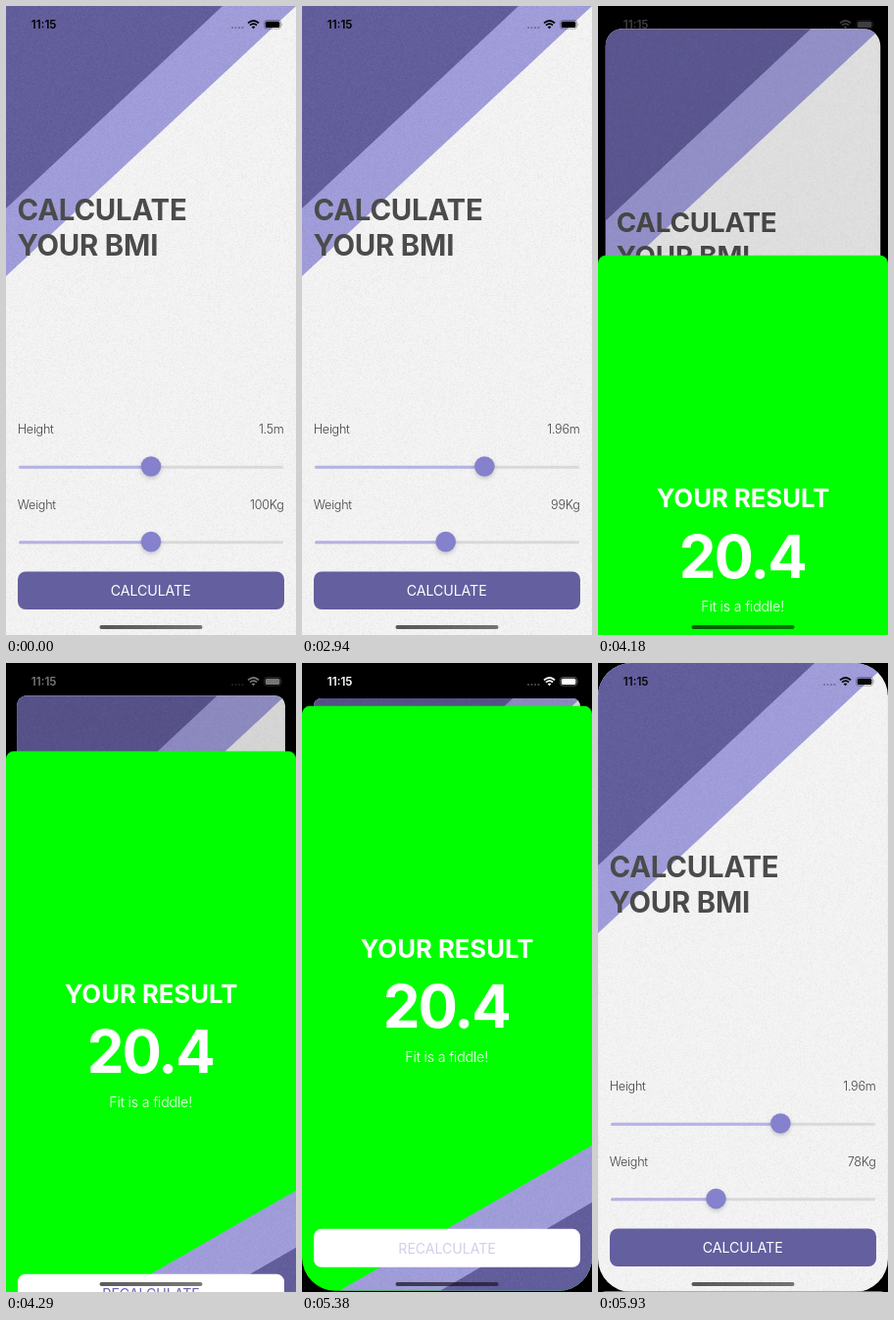
Write an HTML page with a canvas that moves like this. It is 296 px wide and 640 px high and loops after 5.99 s.

```html
<!DOCTYPE html>
<html lang="en">
<head>
<meta charset="utf-8">
<title>BMI calculator</title>
<style>
  html, body { margin: 0; width: 100%; height: 100%; overflow: hidden; background: #000; }
  #stage { position: relative; width: 296px; height: 640px; overflow: hidden; background: #000; }
  #stage > *, #card > *, #sheet > * { position: absolute; left: 0; top: 0; display: block; }
  #card { width: 296px; height: 640px; overflow: hidden; background: #f4f4f4; transform-origin: 50% 0; }
  #dim { width: 100%; height: 100%; background: #000; }
  #sheet { width: 296px; height: 595px; overflow: hidden; background: #0f0; border-radius: 8px 8px 34px 34px; }
  #sheet canvas { clip-path: polygon(296px 447px, 296px 595px, 38px 595px); }
  text { font-family: Inter, "Liberation Sans", sans-serif; }
  .title { font-size: 29.3px; font-weight: 700; letter-spacing: -.2px; fill: #4b4b4b; }
  .label { font-size: 12.6px; font-weight: 300; letter-spacing: -.25px; fill: #444; }
  .button { font-size: 14.2px; letter-spacing: -.1px; text-anchor: middle; }
  .end { text-anchor: end; }
  .result { font-weight: 700; text-anchor: middle; fill: #fff; }
  .clock { font-size: 11.7px; font-weight: 600; fill: currentColor; }
  .knob { fill: #8581cd; filter: drop-shadow(0 2px 2px rgba(0, 0, 0, .18)); }
</style>
</head>
<body>
<div id="stage">
  <div id="card">
    <svg width="296" height="640">
      <path d="M0 0H296L0 275Z" fill="#a09ddb"/>
      <path d="M0 0H221L0 206Z" fill="#625d9c"/>
    </svg>
    <canvas width="296" height="640"></canvas>
    <svg width="296" height="640">
      <text class="title" x="11.5" y="218">CALCULATE</text>
      <text class="title" x="11.5" y="254.2">YOUR BMI</text>
      <g id="sliders"></g>
      <rect x="12" y="575.5" width="272" height="38.5" rx="8" fill="#645f9e"/>
      <text class="button" id="calculate" x="147.7" y="600.3" fill="#fff">CALCULATE</text>
    </svg>
    <div id="dim"></div>
  </div>
  <div id="sheet">
    <svg width="296" height="595">
      <path d="M296 447V595H38Z" fill="#a09ddb"/>
      <path d="M296 505V595H141Z" fill="#625d9c"/>
    </svg>
    <canvas width="296" height="595"></canvas>
    <svg width="296" height="595">
      <text class="result" x="148" y="256.5" font-size="25.7">YOUR RESULT</text>
      <text class="result" x="147.2" y="327.7" font-size="60" letter-spacing="-2">20.4</text>
      <text class="result" x="147.7" y="362" font-size="14.2" letter-spacing="-.15" style="font-weight:300">Fit is a fiddle!</text>
      <rect x="12" y="532" width="272" height="39" rx="8" fill="#fff"/>
      <text class="button" id="recalculate" x="148" y="557.3" fill="#6863b8">RECALCULATE</text>
    </svg>
  </div>
  <svg id="status" width="296" height="40">
    <text class="clock" x="25.8" y="23.2">11:15</text>
    <g fill="currentColor" opacity=".3">
      <circle cx="231" cy="22" r="1.1"/><circle cx="234.5" cy="22" r="1.1"/>
      <circle cx="238" cy="22" r="1.1"/><circle cx="241.5" cy="22" r="1.1"/>
    </g>
    <g fill="none" stroke="currentColor" stroke-width="1.8">
      <path d="M247 17.4Q252.5 12.6 258 17.4M249 19.7Q252.5 16.6 256 19.7"/>
      <path d="M250.6 21.3Q252.5 19.8 254.4 21.3L252.5 23.3Z" fill="currentColor" stroke="none"/>
    </g>
    <rect x="263.6" y="14.5" width="17" height="8.6" rx="2.5" fill="none" stroke="currentColor" stroke-width=".8" opacity=".4"/>
    <rect x="264.8" y="15.7" width="14.6" height="6.2" rx="1.5" fill="currentColor"/>
    <path d="M281.6 17.4Q283 18.8 281.6 20.2Z" fill="currentColor" opacity=".5"/>
  </svg>
  <svg width="296" height="640">
    <linearGradient id="bar"><stop stop-opacity=".64"/><stop offset="1" stop-opacity=".52"/></linearGradient>
    <rect x="95.5" y="630" width="105" height="4" rx="2" fill="url(#bar)"/>
  </svg>
</div>
<script>
const LOOP = 5990, OPEN = 4059, CLOSE = 5444, FADE = 500;
const $ = id => document.getElementById(id);
const mix = (a, b, k) => a + (b - a) * k;
const clamp = v => Math.min(1, Math.max(0, v));

// [start, value] steps; each value holds until the next one
const heights = [[0, 1.5], [1590, 1.55], [1740, 1.7], [1860, 1.88], [1980, 1.96]];
const weights = [[0, 100], [2940, 99], [3050, 89], [3200, 79], [3850, 78]];
const ticks = [0, 4070, 4180, 4290, 4400, 4520, 5380, 5490, 5600, 5710, 5820, 5930];
const at = (steps, t) => steps.filter(s => s[0] <= t).pop()[1];

// Paper grain from a seeded generator
function grain(canvas) {
  const ctx = canvas.getContext('2d');
  const image = ctx.createImageData(canvas.width, canvas.height);
  let seed = 7;
  const random = () => (seed = seed * 16807 % 2147483647) / 2147483647;
  for (let i = 0; i < image.data.length; i += 4) {
    image.data.fill(random() < .5 ? 255 : 0, i, i + 3);
    image.data[i + 3] = random() * 10;
  }
  ctx.putImageData(image, 0, 0);
}
document.querySelectorAll('canvas').forEach(grain);

function slider(name, y, max, format) {
  $('sliders').insertAdjacentHTML('beforeend', `
    <g><text class="label" x="11.8" y="${y - 34}">${name}</text>
    <text class="label end" x="283.5" y="${y - 34}"></text>
    <rect x="13" y="${y - 1.5}" width="270" height="3" rx="1.5" fill="#d9d9d9"/>
    <rect x="13" y="${y - 1.5}" height="3" rx="1.5" fill="#b5b2e5"/>
    <circle class="knob" cy="${y - .7}" r="10.3"/></g>`);
  const group = $('sliders').lastElementChild;
  const [, value, , fill, knob] = group.children;
  return v => {
    const x = 23 + 250 * v / max;
    value.textContent = format(v);
    fill.setAttribute('width', x - 13);
    knob.setAttribute('cx', x);
  };
}
const setHeight = slider('Height', 469.2, 3, v => v + 'm');
const setWeight = slider('Weight', 545.8, 200, v => v + 'Kg');

// Critically damped spring, 0 to 1
function spring(ms) {
  const u = Math.max(0, ms) * Math.sqrt(1000 / 3) / 1000;
  return 1 - (1 + u) * Math.exp(-u);
}

function render(t) {
  setHeight(at(heights, t));
  setWeight(at(weights, t));
  $('calculate').style.opacity = t >= 3850 && t < 4070 ? .3 : 1;
  $('recalculate').style.opacity = t >= 5380 ? .3 : 1;

  const now = ticks.filter(s => s <= t).pop();
  const closing = now >= CLOSE;
  const p = closing ? 1 - spring(now - CLOSE) : spring(now - OPEN);
  const scale = 1 - p * 24 / 296;
  $('card').style.transform = `translateY(${36 * p}px) scale(${scale})`;
  $('card').style.borderRadius = p > 0 ? mix(34, 8, p) / scale + 'px' : 0;
  $('dim').style.opacity = .13 * p;
  $('sheet').style.transform = `translateY(${mix(640, 43.8, p)}px)`;

  const white = closing ? 1 - clamp((now - CLOSE) / FADE) : clamp((now - OPEN) / FADE);
  const tone = Math.round(255 * white);
  $('status').style.color = `rgb(${tone},${tone},${tone})`;
}

const start = performance.now();
function frame() {
  render((performance.now() - start) % LOOP);
  requestAnimationFrame(frame);
}
frame();
</script>
</body>
</html>
```
